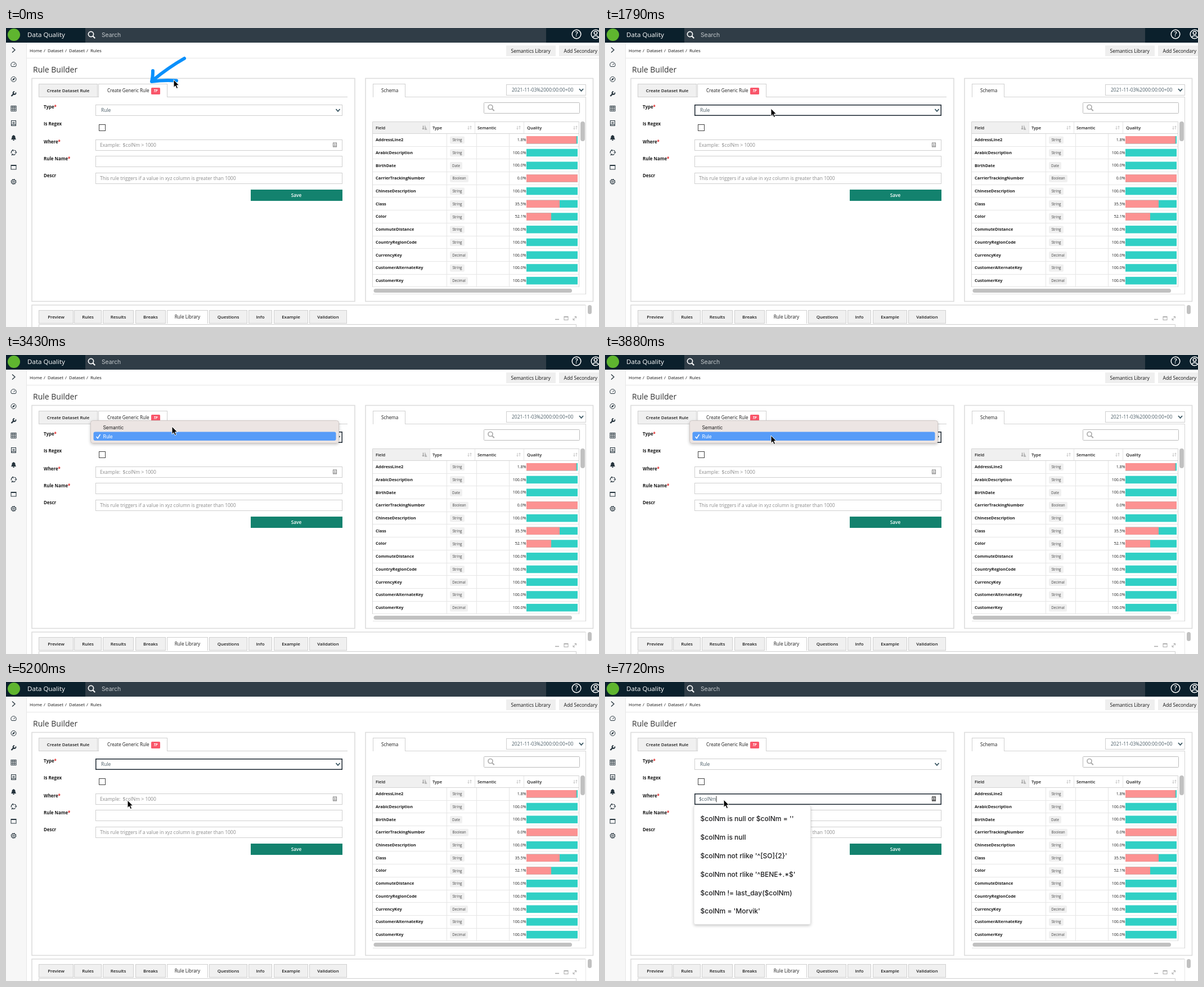
An HTML page that plays this animation: 1054 px wide and 531 px high, repeating every 8000 ms.

```html
<!DOCTYPE html>
<html lang="en">
<head>
<meta charset="utf-8">
<title>Rule Builder</title>
<style>
html, body { margin: 0; width: 100%; height: 100%; overflow: hidden; background: #fff }
svg { display: block; width: 1054px; height: 531px; font-family: "Open Sans", sans-serif }
.ui { font-family: Inter, sans-serif }
</style>
</head>
<body>
<svg id="stage" viewBox="0 0 1054 531"></svg>
<script>
const LINE = '#dcdcdc', INK = '#1c1c1c', GREY = '#8a8a8a', SLATE = '#4a5c66';
const stage = document.getElementById('stage');

const rect = (x, y, w, h, fill, stroke, extra = '') =>
  `<rect x="${x}" y="${y}" width="${w}" height="${h}" fill="${fill}" stroke="${stroke || 'none'}" ${extra}/>`;
const path = (d, color, width = 1, extra = '') =>
  `<path d="${d}" fill="none" stroke="${color}" stroke-width="${width}" ${extra}/>`;
const circle = (x, y, r, fill, stroke = 'none', width = 1) =>
  `<circle cx="${x}" cy="${y}" r="${r}" fill="${fill}" stroke="${stroke}" stroke-width="${width}"/>`;
// y is the middle of the capitals
const text = (x, y, str, size = 8.5, fill = INK, extra = '') =>
  `<text x="${x}" y="${y + size * .36}" font-size="${size}" fill="${fill}" ${extra}>${str}</text>`;
const group = (id, body, extra = '') => `<g id="${id}" ${extra}>${body}</g>`;
const BOLD = 'font-weight="700"', SEMI = 'font-weight="600"', MID = 'text-anchor="middle"';
const chevron = (x, y, color) => path(`M${x - 3.5} ${y - 2}l3.5 4 3.5 -4`, color, 1.8);
const lens = (x, y, r, color) =>
  circle(x, y, r, 'none', color, 1.7) + path(`M${x + r * .7} ${y + r * .7}l4 4`, color, 2);

function header() {
  return rect(0, 0, 1054, 26, '#0b202c') + rect(141, 0, 819, 26, '#303d47') +
    circle(14, 12, 11, '#5fb52f') +
    text(38, 12, 'Data Quality', 11.6, '#fff') +
    lens(151, 11, 4.6, '#fff') + text(170, 12, 'Search', 10.3, '#c3c8cb', 'class="ui"') +
    circle(1014, 11, 7.8, 'none', '#fff', 1.5) +
    text(1014, 11, '?', 12, '#fff', MID + ' ' + SEMI) +
    circle(1048, 11, 7.8, 'none', '#fff', 1.5) + circle(1048, 8.8, 2.8, 'none', '#fff', 1.5) +
    path('M1042.5 16.5q5.5 -6 11 0', '#fff', 1.5);
}

function sidebar() {
  const c = '#26343d';
  const at = (y, body) => `<g transform="translate(13.5 ${y})">${body}</g>`;
  const ring = circle(0, 0, 4.5, 'none', c);
  return rect(0, 26, 36, 505, '#f7f7f7') + path('M36.5 26V531', '#e6e6e6') +
    at(39, path('M-2.5 -4.5L2.5 0L-2.5 4.5', c, 1.3)) +
    at(65, path('M-3.5 3.5A4.7 4.7 0 1 1 3.5 3.5ZM0 1L2.5 -2', c)) +
    at(91, ring + `<path d="M2.5 -2.5L1 1L-2.5 2.5L-1 -1Z" fill="${c}"/>`) +
    at(117, path('M-4 4L1 -1', c, 2.4) + path('M3.8 -2.5A2.5 2.5 0 1 1 1.5 -4', c, 1.8)) +
    at(143, rect(-4.5, -4.5, 9, 9, 'none', c) + path('M-4.5 -2H4.5M-4.5 1.3H4.5M-1.5 -4V4.5M1.5 -4V4.5', c)) +
    at(169, rect(-4, -4.5, 8, 9, 'none', c) + path('M-2 -1.5H2M-2 .5H2M-4 2.5H4', c)) +
    at(195, `<path d="M-4.5 3Q-3 1 -3 -1A3 3.3 0 0 1 3 -1Q3 1 4.5 3ZM-1.3 3.6H1.3V5H-1.3ZM-.6 -5H.6V-3H-.6Z" fill="${c}"/>`) +
    at(221, path('M-4 1.5A4.3 4.3 0 0 1 -1 -4M1.5 -4A4.3 4.3 0 0 1 4.2 1M3 3A4.3 4.3 0 0 1 -2.5 3.5', c, 1.2) +
      path('M-2.5 -4.5H-.3V-2M5.5 -.5L4 1.5L2 .3M-3 5.5V3H-.5', c)) +
    at(247, rect(-4.5, -3.5, 9, 7.5, 'none', c) + path('M-4.5 -2.8H4.5', c, 1.6)) +
    at(273, circle(0, 0, 3.6, 'none', c, 1.1) + circle(0, 0, 1.4, 'none', c) +
      circle(0, 0, 4.6, 'none', c, 1).replace('/>', ' stroke-dasharray="1.8 1.81"/>'));
}

function topBar() {
  const crumbs = [[42, 'Home'], [67, '/'], [74, 'Dataset'], [105, '/'], [112, 'Dataset'], [143, '/'], [150, 'Rules']];
  return path('M36 53.5H1054', '#e6e6e6') +
    crumbs.map(([x, s]) => text(x, 40, s, 7.8, '#111', 'font-weight="500"')).join('') +
    rect(889, 31, 88, 19, '#efefef') + text(897.5, 40.5, 'Semantics Library', 8.5, '#111') +
    rect(983, 31, 80, 19, '#efefef') + text(991.5, 40.5, 'Add Secondary', 8.5, '#111') +
    text(48, 73.5, 'Rule Builder', 14, '#333');
}

const tab = (x, w, y, label, active) =>
  rect(x + .5, y + .5, w, 23, active ? '#fff' : '#f0f0f0', '#cfcfcf') +
  (active ? rect(x + 1, y + 22, w - 1, 3, '#fff') : '') +
  (label ? text(x + w / 2 + .5, y + 12.5, label, active ? 8.2 : 7.9, INK, MID + (active ? '' : ' ' + SEMI)) : '');

const label = (y, str, must) =>
  text(67, y, str + (must ? '<tspan fill="#e02020">*</tspan>' : ''), 7.9, INK, BOLD);
const field = y => rect(159.5, y + .5, 438, 19, '#fff', '#cfcfcf');
const focusRing = (id, y) => group(id, rect(159.75, y + .75, 437.5, 18.5, 'none', '#1b2630', 'stroke-width="1.5"'));
const card = color => `<g stroke="${color}" fill="none">${rect(581.5, 204, 6, 7, 'none', color)}</g>` +
  circle(584.5, 206.5, 1.1, color) + path('M582.8 209.2H586.2', color, 1.2);

function form() {
  return rect(46, 89.5, 574, 396, '#fff', LINE, 'stroke-width="1.6"') +
    path('M58 122.5H607', '#cfcfcf') +
    tab(58, 104, 99, 'Create Dataset Rule') + tab(164, 122, 99, '', true) +
    text(180, 111.5, 'Create Generic Rule', 8.1) +
    rect(258, 106, 16, 12, '#f9566a', '', 'rx="1.5"') +
    text(266, 112, 'TP', 6.3, '#fff', MID + ' font-weight="700" font-style="italic"') +
    label(140.5, 'Type', true) + label(170.5, 'Is Regex') + label(202, 'Where', true) +
    label(232, 'Rule Name', true) + label(262, 'Descr') +
    field(136) + text(169, 146, 'Rule', 8.5, SLATE) + chevron(590, 146, '#33505c') +
    rect(165.5, 171.5, 11, 11, '#fff', '#444') +
    field(198) + field(227) + field(257) + card('#777') +
    text(167, 267, 'This rule triggers if a value in xyz column is greater than 1000', 8.5, GREY) +
    rect(435, 287, 163, 20, '#13826e') + text(516, 297, 'Save', 8.3, '#fff', MID + ' ' + SEMI);
}

function schema() {
  const rows = [['AddressLine2', 'String', 1.8], ['ArabicDescription', 'String', 100], ['BirthDate', 'Date', 100],
    ['CarrierTrackingNumber', 'Boolean', 0], ['ChineseDescription', 'String', 100], ['Class', 'String', 35.5],
    ['Color', 'String', 52.1], ['CommuteDistance', 'String', 100], ['CountryRegionCode', 'String', 100],
    ['CurrencyKey', 'Decimal', 100], ['CustomerAlternateKey', 'String', 100], ['CustomerKey', 'Decimal', 100]];
  const pill = { String: 26, Date: 22, Boolean: 33, Decimal: 32 };
  const sort = x => path(`M${x} 174V180M${x - 1.5} 178.5L${x} 180L${x + 1.5} 178.5M${x + 4} 180V174M${x + 2.5} 175.5L${x + 4} 174L${x + 5.5} 175.5`, '#bbb', .9);
  let out = rect(639, 89.5, 404.5, 396, '#fff', LINE, 'stroke-width="1.6"') +
    path('M652 122.5H1030.5V473', '#d4d4d4') + tab(652, 57, 99, '', true) + text(667, 111.5, 'Schema', 8.2) +
    rect(889.5, 100.5, 141, 19, '#fff', '#cfcfcf') +
    text(899, 110, '2021-11-03%2000:00:00+00', 8.5, SLATE) + chevron(1022.5, 110, '#33505c') +
    rect(849.5, 132.5, 170, 19, '#fff', '#bbb', 'rx="1"') + lens(861, 140.5, 4, '#aaa') +
    rect(652, 167, 101, 20, '#f0f0f0') + path('M651.5 460V166.5H1018.5V460M651.5 187.5H1018.5', '#d4d4d4') +
    path('M753.5 167V187M833.5 167V187M920.5 167V187', '#e4e4e4') +
    [[657, 'Field'], [758, 'Type'], [838, 'Semantic'], [926, 'Quality']]
      .map(([x, s]) => text(x, 177.5, s, 7.5, INK, SEMI)).join('') +
    path('M741.5 173.5V180M740 178.5L741.5 180L743 178.5M744 174H745.2M744 176H746.2M744 178H747.2M744 180H748.2', '#777', .9) +
    [822, 909, 1010].map(sort).join('') +
    path('M783.5 188V460M836.5 188V460M894.5 188V460', '#e6e6e6');
  rows.forEach(([name, type, good], i) => {
    const y = 198.5 + i * 22.72, w = pill[type], bad = Math.round(91 * (100 - good) / 100);
    out += path(`M652 ${Math.round(y + 11) + .5}H1018`, '#e6e6e6') +
      text(657, y, name, 7.4, INK, BOLD) +
      rect(789, y - 6, w, 13, '#f0f0f0', '', 'rx="2"') + text(789 + w / 2, y + .5, type, 6.3, '#444', MID) +
      text(924.5, y, good.toFixed(1) + '%', 7, INK, 'text-anchor="end"') +
      rect(925, y - 6.5, 91, 13.5, '#30d0c5') + rect(925, y - 6.5, bad, 13.5, '#fc9292');
  });
  return out + rect(1021, 166, 8, 35, '#c1c1c1', '', 'rx="4"') +
    rect(653.5, 463, 352.5, 7, '#c1c1c1', '', 'rx="3.5"') + path('M652 472.5H1030', '#e2e2e2');
}

function bottomPanel() {
  const tabs = [[58, 61, 'Preview'], [121, 48, 'Rules'], [172, 54, 'Results'], [230, 53, 'Breaks'], [286, 72, 'Rule Library'],
    [361, 67, 'Questions'], [431, 41, 'Info'], [476, 60, 'Example'], [539, 66, 'Validation']];
  return path('M46 531V492H1030', LINE, 1.6) + path('M1030.5 492V531', '#e6e6e6') +
    path('M58.5 531V526.5H1013.5V531', '#cfcfcf') +
    tabs.map(([x, w, s], i) => tab(x, w, 501, s, i == 4)).join('') +
    path('M976 517.5H983', '#aaa', 1.5) + rect(992, 512.5, 7, 6, 'none', '#aaa') + path('M992 513H999', '#aaa', 1.6) +
    path('M1008 518.5L1013.5 512.5M1010.5 512.5H1013.5V515.5M1008 515.5V518.5H1011', '#aaa') +
    rect(1034, 492, 7, 16, '#c1c1c1', '', 'rx="3.5"');
}

function overlays() {
  const hints = ["$colNm is null or $colNm = ''", '$colNm is null', "$colNm not rlike '^[SO]{2}'",
    "$colNm not rlike '^BENE+.*$'", '$colNm != last_day($colNm)', "$colNm = 'Morvik'"];
  return focusRing('typeFocus', 136) +
    group('whereFocus', focusRing('whereRing', 198) + card('#222')) +
    text(167, 208, 'Example:\u00a0 $colNm &gt; 1000', 8.5, GREY, 'id="placeholder"') +
    text(167, 208, '', 8.5, SLATE, 'id="typed"') +
    group('caret', rect(0, 202.5, .9, 11, '#222')) +
    group('menu', rect(150.5, 116.5, 441, 40, '#ece5e3', '#cfc8c6', 'rx="4" filter="url(#soft)"') +
      rect(155.5, 0, 431, 15.5, '#579cf8', '', 'rx="3" id="bar"') +
      text(172.5, 129, 'Semantic', 8.4, INK, 'class="ui" id="opt0"') +
      text(172.5, 144.5, 'Rule', 8.4, INK, 'class="ui" id="opt1"') +
      path('M160.5 145L163 148L167.5 141', '#fff', 1.5, 'id="tick"')) +
    group('hints', rect(158, 219, 207.5, 211.5, '#fff', '#d8d8d8', 'rx="3" stroke-width=".7" filter="url(#soft)"') +
      hints.map((s, i) => text(169.5, 243 + i * 32.8, s, 12, '#1d1d1f', 'class="ui" font-weight="500"')).join('')) +
    group('arrow', path('M317 54Q289 70 262 92M261 76Q261 87 259 95Q280 92 303 93.5', '#0a90fb', 6,
      'stroke-linecap="round" stroke-linejoin="round"')) +
    group('cursor', '<path d="M0 0V13.6L3.1 10.8L5.2 15.6L7.6 14.5L5.5 9.8H9.7Z" fill="#000" stroke="#fff" stroke-width="1"/>');
}

stage.innerHTML = '<defs><filter id="soft" x="-10%" y="-30%" width="120%" height="180%">' +
  '<feDropShadow dx="0" dy="2" stdDeviation="2.5" flood-opacity=".22"/></filter></defs>' +
  header() + sidebar() + topBar() + form() + schema() + bottomPanel() + overlays();

const el = id => document.getElementById(id);
const show = (id, on) => el(id).style.display = on ? '' : 'none';
const between = (t, a, b) => t >= a && t < b;
const last = (list, t) => list.filter(k => k[0] <= t).pop();

const moves = [[0, 298, 92], [1200, 297, 118], [1350, 295, 143], [3430, 295, 127], [3730, 295, 130], [3880, 295, 143],
  [4470, 291, 160], [4620, 269, 210], [4770, 246, 212], [4910, 228, 212], [5060, 216, 210], [5210, 212, 209], [5650, 211, 209]];
const typing = [[0, 0], [6090, 1], [6680, 2], [6980, 3], [7130, 4], [7420, 5], [7720, 6]];

function draw(t) {
  const [, x, y] = last(moves, t), count = last(typing, t)[1];
  const semantic = between(t, 3580, 3880), where = t >= 5210;
  el('cursor').setAttribute('transform', `translate(${x} ${y})`);
  show('arrow', t < 1200);
  show('typeFocus', between(t, 1790, 5210));
  show('menu', between(t, 2390, 4470));
  el('bar').setAttribute('y', semantic ? 121 : 136.5);
  el('opt0').setAttribute('fill', semantic ? '#fff' : INK);
  el('opt1').setAttribute('fill', semantic ? INK : '#fff');
  el('tick').setAttribute('stroke', semantic ? INK : '#fff');
  show('whereFocus', where);
  show('hints', t >= 5500);
  show('placeholder', !count);
  el('typed').textContent = '$colNm'.slice(0, count);
  show('caret', where);
  const width = count ? el('typed').getComputedTextLength() : 0;
  el('caret').setAttribute('transform', `translate(${167 + width} 0)`);
}

const start = performance.now();
function tick() {
  draw((performance.now() - start) % 8000);
  requestAnimationFrame(tick);
}
tick();
</script>
</body>
</html>
```
